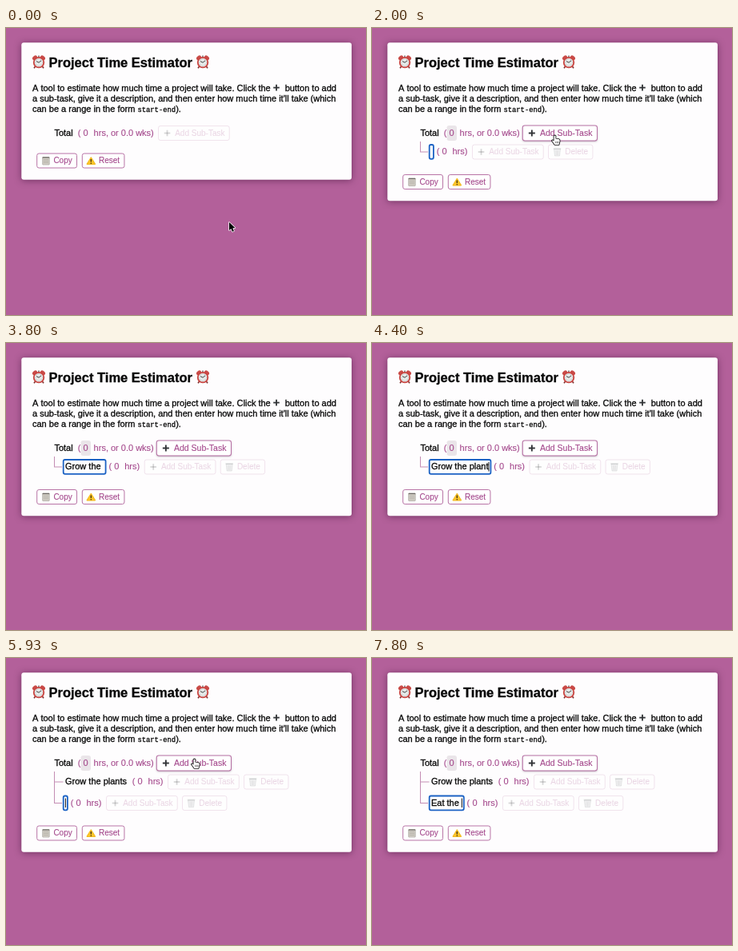
Animation of 450x359 px, one loop 8000 ms. Source, as an HTML page with a canvas:

```html
<!DOCTYPE html>
<html lang="en">
<head>
<meta charset="utf-8">
<title>Project Time Estimator</title>
<style>
  html, body { margin: 0; width: 100%; height: 100%; overflow: hidden; background: #b3609a; }
  canvas { display: block; }
</style>
</head>
<body>
<canvas id="stage" width="450" height="359"></canvas>
<script>
const ctx = document.getElementById('stage').getContext('2d');
const LOOP = 8000, BLINK = 530, ROW_STEP = 26.5, TOTAL_Y = 131.5;
const PURPLE = '#a4488c', BORDER = '#b873a6', INK = '#080808', SANS = '"Liberation Sans", Arial, sans-serif';
const BODY = `11px ${SANS}`, LABEL = `10px ${SANS}`;
const FADED = 0.19;

// Typing comes in bursts with an even rhythm.
const tasks = [
  { born: 1130, bursts: [
    { text: 'G', start: 2130, step: 100 },
    { text: 'row the ', start: 2390, step: 100 },
    { text: 'plants', start: 3870, step: 130 }] },
  { born: 5670, bursts: [
    { text: 'E', start: 6600, step: 100 },
    { text: 'at ', start: 6920, step: 170 },
    { text: 'the ', start: 7470, step: 105 }] }
];
const START = { x: 279, y: 243 }, FIRST_CLICK = { x: 228.5, y: 134.5 }, SECOND_CLICK = { x: 235.5, y: 126.5 };

const clamp = v => Math.min(1, Math.max(0, v));
const ease = v => v * v * (3 - 2 * v);
const progress = (t, start, end) => ease(clamp((t - start) / (end - start)));
const baseline = cy => Math.floor(cy + 3.5);

// A hairline outline gives the text its slightly heavier weight.
function text(s, x, y, font = BODY, color = INK) {
  ctx.font = font;
  ctx.fillStyle = ctx.strokeStyle = color;
  ctx.lineWidth = color === INK ? 0.3 : 0.12;
  ctx.fillText(s, x, y);
  ctx.strokeText(s, x, y);
}
function measure(s, font) {
  ctx.font = font;
  return ctx.measureText(s).width;
}
function box(x, y, w, h, r, fill, stroke, lineWidth = 1) {
  ctx.beginPath();
  ctx.roundRect(x, y, w, h, r);
  paint(fill, stroke, lineWidth);
}
function disc(x, y, r, fill) {
  ctx.beginPath();
  ctx.arc(x, y, r, 0, 7);
  paint(fill);
}
function line(x1, y1, x2, y2, stroke, width = 1) {
  ctx.beginPath();
  ctx.moveTo(x1, y1);
  ctx.lineTo(x2, y2);
  paint(null, stroke, width);
}
function shape(d, fill, stroke, width) {
  ctx.lineJoin = 'round';
  const p = new Path2D(d);
  if (stroke) { ctx.strokeStyle = stroke; ctx.lineWidth = width; ctx.stroke(p); }
  ctx.fillStyle = fill;
  ctx.fill(p);
}
function paint(fill, stroke, width) {
  if (fill) { ctx.fillStyle = fill; ctx.fill(); }
  if (stroke) { ctx.strokeStyle = stroke; ctx.lineWidth = width; ctx.stroke(); }
}
function shadow(color, blur, dy) {
  ctx.shadowColor = color;
  ctx.shadowBlur = blur;
  ctx.shadowOffsetY = dy;
}
function at(x, y, draw, scale = 1, alpha = 1) {
  ctx.save();
  ctx.translate(x, y);
  ctx.scale(scale, scale);
  ctx.globalAlpha *= alpha;
  draw();
  ctx.restore();
}

const icons = {
  plus() {
    line(-3.8, 0, 3.8, 0, '#303336', 1.8);
    line(0, -3.8, 0, 3.8, '#303336', 1.8);
  },
  note() {
    box(-4, -4.5, 8.5, 9.5, 0.5, '#d5d1c8', '#a5a19b', 0.7);
    line(-4, -4, 4.5, -4, '#6d6964', 1.2);
    for (let y = -1.5; y < 4; y += 2) line(-3, y, 3.4, y, '#a09c94', 0.6);
  },
  warning() {
    shape('M0-4 5 4.2H-5Z', '#fcc52a', '#f0b41c', 1.4);
    line(0, -2, 0, 1.5, '#3a2c10', 1.3);
    disc(0, 3.2, 0.8, '#3a2c10');
  },
  trash() {
    shape('M-4-3.5H4L3 5H-3Z', '#b9bcbe', '#6d7072', 0.8);
    line(-4.7, -4, 4.7, -4, '#626567', 1.6);
    for (let x = -1.5; x < 2; x += 1.5) line(x, -2, x * 0.8, 4, '#85888a', 0.6);
  },
  clock() {
    line(0, -8, 0, -5, '#8f8583', 2);
    for (const side of [-1, 1]) {
      line(side * 4, 5, side * 6, 7.8, '#7d2d2c', 1.6);
      ctx.beginPath();
      ctx.ellipse(side * 5, -5.2, 3.4, 2.3, side * 0.72, 0, 7);
      paint('#c94b48');
    }
    disc(0, 0.6, 7.2, '#c94541');
    disc(0, 0.6, 5.4, '#e6eae9');
    for (let a = 0; a < 6; a += Math.PI / 6) disc(4.3 * Math.cos(a), 0.6 + 4.3 * Math.sin(a), 0.35, '#777');
    line(-3, -0.8, 0, 0.7, '#333', 0.9);
    line(0, 0.7, 3, -1.6, '#333', 0.9);
  }
};

function button(x, cy, icon, label, { alpha = 1, hover = 0 } = {}) {
  const w = measure(label, LABEL) + 27.5;
  at(x + w / 2, cy, () => {
    ctx.save();
    if (hover > 0) shadow(`rgba(60,30,60,${0.4 * hover})`, 2.5, 1);
    box(-w / 2 + 0.5, -9, w - 1, 18, 2.5, '#fff');
    ctx.restore();
    box(-w / 2 + 0.5, -9, w - 1, 18, 2.5, null, BORDER);
    at(-w / 2 + 11.5, 0, icons[icon]);
    text(label, -w / 2 + 21.2, 3.3, LABEL, PURPLE);
  }, 1 + 0.05 * hover, alpha);
}

function hours(x, cy, unit) {
  const y = baseline(cy);
  text('(', x, y, BODY, PURPLE);
  text('0', x + 6.8, y, BODY, PURPLE);
  text(unit, x + 19.8, y, BODY, PURPLE);
}

function typing(task, t) {
  let typed = '', last = task.born;
  for (const { text, start, step } of task.bursts) {
    if (t < start) break;
    const count = Math.min(text.length, Math.floor((t - start) / step) + 1);
    typed += text.slice(0, count);
    last = start + (count - 1) * step;
  }
  return { typed, last };
}

function taskRow(task, cy, t, focused) {
  const { typed, last } = typing(task, t);
  const w = measure(typed, BODY), right = 77.5 + w;
  line(60.5, 142, 60.5, cy, '#c48db4');
  line(60, cy, focused ? 70 : 71.5, cy, '#c48db4');
  if (focused) {
    box(71.7, cy - 9, w + 5.2, 17.8, 2, '#fff', '#1c62c4', 1.8);
    if ((t - last) % (2 * BLINK) < BLINK) line(74.4 + w, cy - 6, 74.4 + w, cy + 5.5, '#111');
  }
  text(typed, 74, baseline(cy));
  hours(right + 3.2, cy, 'hrs)');
  button(right + 47.5, cy, 'plus', 'Add Sub-Task', { alpha: FADED });
  button(right + 142.5, cy, 'trash', 'Delete', { alpha: FADED });
}

function intro() {
  at(41, 42.5, icons.clock);
  at(246, 42.5, icons.clock);
  text('Project Time Estimator', 53.5, 48.5, `bold 16.5px ${SANS}`);
  text('A tool to estimate how much time a project will take. Click the', 33, 79);
  at(338, 74.6, icons.plus);
  text('button to add', 348.7, 79);
  text("a sub-task, give it a description, and then enter how much time it'll take (which", 33, 92);
  text('can be a range in the form', 33, 105);
  text('start-end', 164.5, 105, '8.8px "Liberation Mono", monospace');
  text(').', 212.2, 105);
}

function arrow() {
  shape('M0 0V10L2.3 8 4 11.7 5.9 10.9 4.3 7.3 7.3 7Z', '#000', '#fff', 1.5);
}
function hand() {
  shape('M-1 .5Q0-.6 1 .5V4L5 4.5Q6.4 5 6.2 7L5 11.5H0L-3.6 6.6Q-3 5-1 7Z', '#fff', '#111', 1.7);
  for (let x = 1.2; x < 5; x += 1.6) line(x, 7.3, x, 9.8, '#222', 0.6);
}
function pointer(t) {
  const hidden = (t >= 2070 && t < 5000) || t >= 6600;
  if (hidden) return;
  const [from, to, p] = t < 5000
    ? [START, FIRST_CLICK, progress(t, 70, 870)]
    : [FIRST_CLICK, SECOND_CLICK, progress(t, 5000, 5500)];
  const x = from.x + (to.x - from.x) * p;
  const y = from.y + (to.y - from.y) * p;
  at(x, y, y < 141 ? hand : arrow);
}

function draw(t) {
  ctx.fillStyle = '#b3609a';
  ctx.fillRect(0, 0, 450, 359);
  const rows = tasks.filter(task => t >= task.born);
  const drop = rows.length * ROW_STEP;

  ctx.save();
  shadow('rgba(50,10,45,.5)', 9, 1);
  box(19.3, 18.3, 412.7, 171.4 + drop, 3, '#fefdfe');
  ctx.restore();

  intro();
  text('Total', 60.4, baseline(TOTAL_Y));
  if (rows.length) box(93.5, 122, 12.5, 19, 3, '#eae5e9');
  hours(89.8, TOTAL_Y, 'hrs, or 0.0 wks)');
  const hover = progress(t, 730, 930);
  button(190, TOTAL_Y, 'plus', 'Add Sub-Task', { alpha: FADED + (1 - FADED) * hover, hover });

  rows.forEach((task, i) => taskRow(task, 155 + i * ROW_STEP, t, i === rows.length - 1));
  button(38.2, 166 + drop, 'note', 'Copy');
  button(94.8, 166 + drop, 'warning', 'Reset');
  pointer(t);
}

const began = performance.now();
function frame() {
  draw((performance.now() - began) % LOOP);
  requestAnimationFrame(frame);
}
frame();
</script>
</body>
</html>
```
